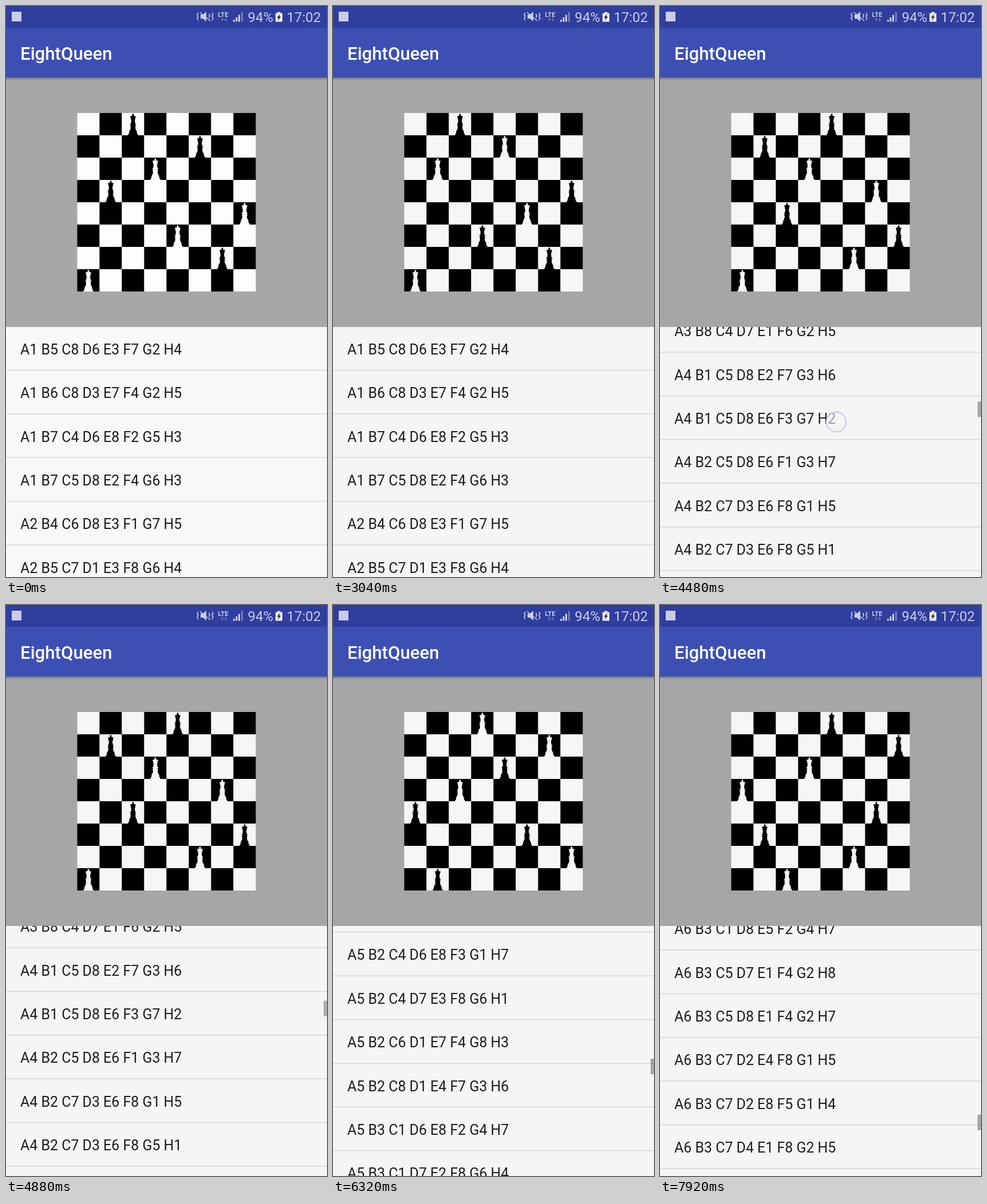
Recreate the animation shown at these times as an HTML page. Size 561x998 px, loop 8000 ms.

```html
<!DOCTYPE html>
<html lang="en">
<head>
<meta charset="utf-8">
<title>EightQueen</title>
<style>
  html, body { margin: 0; width: 100%; height: 100%; overflow: hidden; }
  svg { display: block; width: 100vw; height: 100vh; font-family: Roboto, sans-serif; }
  #rows text { font-size: 24.93px; fill: #1c1c1c; }
  #rows rect { fill: #d8d8d8; }
  .status { fill: #c9cdea; }
  .status text { font-size: 24px; }
  .dark { fill: #000; }
  svg { --paper: #f5f5f5; --light: #f6f6f6; --wall: #a6a6a6; }
  svg.warm { --paper: #f9f8f6; --light: #fdfdfd; --wall: #a8a7a5; }
  .paper { fill: var(--paper); }
  .light { fill: var(--light); }
  .wall { fill: var(--wall); }
</style>
</head>
<body>
<svg id="stage" viewBox="0 0 561 998" preserveAspectRatio="none">
  <defs>
    <linearGradient id="shade" x2="0" y2="1">
      <stop offset="0" stop-opacity=".32"/>
      <stop offset="1" stop-opacity="0"/>
    </linearGradient>
  </defs>
  <rect class="paper" y="561" width="561" height="437"/>
  <rect id="press" width="561" height="74.8" opacity="0"/>
  <g id="rows"></g>
  <rect id="bar" x="555" width="6" height="27.2" fill="#000" opacity="0"/>

  <rect class="wall" y="120" width="561" height="441"/>
  <rect y="124" width="561" height="6" fill="url(#shade)"/>
  <g id="board" transform="translate(124.5 187)"></g>
  <g id="queens" transform="translate(124.5 187)"></g>

  <rect width="561" height="38" fill="#303e9d"/>
  <rect y="38" width="561" height="87" fill="#3c4fb3"/>
  <text x="25" y="93.5" font-size="31.2" font-weight="500" fill="#fff">EightQueen</text>

  <g class="status">
    <rect x="10" y="10" width="17" height="17"/>
    <path d="M340 15h4l6-5v17l-6-5h-4z"/>
    <path d="M339 11l18 15M336 12l-2 3 2 3-2 3 2 4M354 14l2 2-1 5M360 12l2 3-2 3 2 3-2 4"
          fill="none" stroke="#c9cdea" stroke-width="1.6"/>
    <text x="370.5" y="18.5" style="font-size:11px" font-weight="700">LTE</text>
    <path id="data" d="M378 20.5l2.6 3h-1.8v3.5h-1.6v-3.5h-1.8zM384 27l2.6-3h-1.8v-3.5h-1.6v3.5h-1.8z"/>
    <path d="M397 24h3v3.500h-3zM401.500 20h3v7.500h-3zM406 15.500h3v12h-3z"/>
    <path d="M411 10.500h3v17h-3z" opacity=".45"/>
    <text x="422.5" y="27.5">94%</text>
    <path d="M474.500 10.500h5v2h3.500v15h-12v-15h3.500z" fill="#f0f1fa"/>
    <path d="M479 13.500l-5.500 7h3l-1.500 5.500 5.500-7.500h-3z" fill="#1b2257"/>
    <text x="490.5" y="27.5">17:02</text>
  </g>
  <circle id="touch" r="17.3" fill="#f5f5f5" fill-opacity=".6" stroke="#cbcbea" stroke-width="2.2" opacity="0"/>
</svg>
<script>
const LOOP = 8000, STEP = 80;
const TOP = 561, VIEW = 437, PITCH = 76.36, CELL = 39;
const $ = id => document.getElementById(id);

function add(parent, tag, attrs, text) {
  const node = document.createElementNS(parent.namespaceURI, tag);
  for (const key in attrs) node.setAttribute(key, attrs[key]);
  if (text) node.textContent = text;
  return parent.appendChild(node);
}

// Every placement of eight queens, in lexicographic order of ranks A to H.
function solve(ranks = []) {
  if (ranks.length === 8) return [ranks];
  const found = [];
  for (let rank = 1; rank <= 8; rank++) {
    const safe = ranks.every((r, i) => r !== rank && Math.abs(r - rank) !== ranks.length - i);
    if (safe) found.push(...solve([...ranks, rank]));
  }
  return found;
}
const solutions = solve();
const TOTAL = solutions.length * PITCH;

// [time, scroll offset]
const scroll = [
  [3600, 0], [3680, 110], [3760, 220], [3840, 476.7], [3920, 790], [4080, 1330], [4240, 1740],
  [4400, 2020], [4480, 2093.3], [4560, 2099.3], [5840, 2099.3], [5920, 2340], [6000, 2640],
  [6080, 2980], [6160, 3280], [6240, 3530], [6320, 3730], [6400, 3857.5], [7440, 3857.5],
  [7520, 3977], [7600, 4098], [7680, 4450], [7760, 4790], [7840, 5075], [7920, 5302.4]
];
// [start, end, x, y, end x, end y]
const touches = [
  [720, 800, 390, 680, 390, 680],
  [3120, 3200, 390, 755, 390, 755],
  [3600, 3760, 400, 900, 387, 681],
  [4480, 4560, 308, 727, 308, 721],
  [4960, 5040, 308, 727, 308, 727],
  [5840, 5920, 310, 880, 296, 640],
  [7040, 7120, 237, 818, 237, 818],
  [7440, 7600, 290, 880, 272, 640]
];
// [time, chosen row]
const picks = [[-LOOP, 0], [880, 1], [3280, 2], [5120, 29], [7200, 53]];
// [scrolling starts, scrolling ends]
const flings = [[3680, 4560], [5920, 6400], [7520, LOOP]];

const half = [[0, 1], [1.7, 2.5], [1, 4.5], [5.2, 6], [3.6, 9], [4.2, 10.5], [3, 12], [3.6, 18],
  [5.8, 19.3], [3.4, 20.8], [5.2, 22.5], [4, 24], [4.4, 28], [7, 33], [6.6, 34.5], [9, 39]];
const outline = [...half, ...half.slice(1).reverse().map(([x, y]) => [-x, y])].join(' ');

const isLight = (col, row) => (col + row) % 2 === 0;
for (let i = 0; i < 64; i++) {
  const col = i % 8, row = i >> 3;
  add($('board'), 'rect', {
    x: col * CELL, y: row * CELL, width: CELL, height: CELL,
    class: isLight(col, row) ? 'light' : 'dark'
  });
}
const queens = [...'ABCDEFGH'].map(() => add($('queens'), 'polygon', { points: outline }));

solutions.forEach((ranks, i) => {
  const label = ranks.map((rank, col) => 'ABCDEFGH'[col] + rank).join(' ');
  add($('rows'), 'text', { x: 25, y: TOP + 47.8 + i * PITCH }, label);
  add($('rows'), 'rect', { y: TOP + 74.8 + i * PITCH, width: 561, height: 1.56 });
});

function sample(points, t) {
  const next = points.findIndex(p => p[0] > t);
  if (next === 0) return points[0][1];
  if (next < 0) return points[points.length - 1][1];
  const [t0, a] = points[next - 1], [t1, b] = points[next];
  return a + (b - a) * (t - t0) / (t1 - t0);
}

function placeQueens(ranks) {
  ranks.forEach((rank, col) => {
    const row = 8 - rank;
    queens[col].setAttribute('transform', `translate(${(col + .5) * CELL} ${row * CELL})`);
    queens[col].setAttribute('class', isLight(col, row) ? 'dark' : 'light');
  });
}

function barOpacity(t) {
  const fling = flings.find(([start, end]) => t >= start && t < end + 550);
  return fling ? .32 * Math.min(1, (fling[1] + 550 - t) / 250) : 0;
}

function showTouch(t) {
  const touch = touches.find(([start, end]) => t >= start && t <= end + STEP);
  const dot = $('touch');
  dot.setAttribute('opacity', touch ? (t > touch[1] ? .6 : 1) : 0);
  if (!touch) return;
  const [start, end, x0, y0, x1, y1] = touch;
  const p = Math.min(1, (t - start) / (end - start));
  dot.setAttribute('cx', x0 + (x1 - x0) * p);
  dot.setAttribute('cy', y0 + (y1 - y0) * p);
}

function draw(t) {
  const offset = sample(scroll, t);
  const [pickedAt, picked] = picks.filter(p => p[0] <= t).pop();
  $('stage').classList.toggle('warm', t < 400);
  $('rows').setAttribute('transform', `translate(0 ${-offset})`);
  $('bar').setAttribute('y', TOP + offset * VIEW / TOTAL);
  $('bar').setAttribute('opacity', barOpacity(t));
  $('press').setAttribute('y', TOP + picked * PITCH - offset);
  $('press').setAttribute('opacity', Math.max(0, .08 * (1 - (t - pickedAt) / 240)));
  $('data').setAttribute('opacity', t >= 1280 && t < 2160 ? 1 : .4);
  placeQueens(solutions[picked]);
  showTouch(t);
}

const began = performance.now();
let shown = -1;
function tick() {
  const t = Math.floor((performance.now() - began) % LOOP / STEP) * STEP;
  if (t !== shown) draw(shown = t);
  requestAnimationFrame(tick);
}
tick();
</script>
</body>
</html>
```
